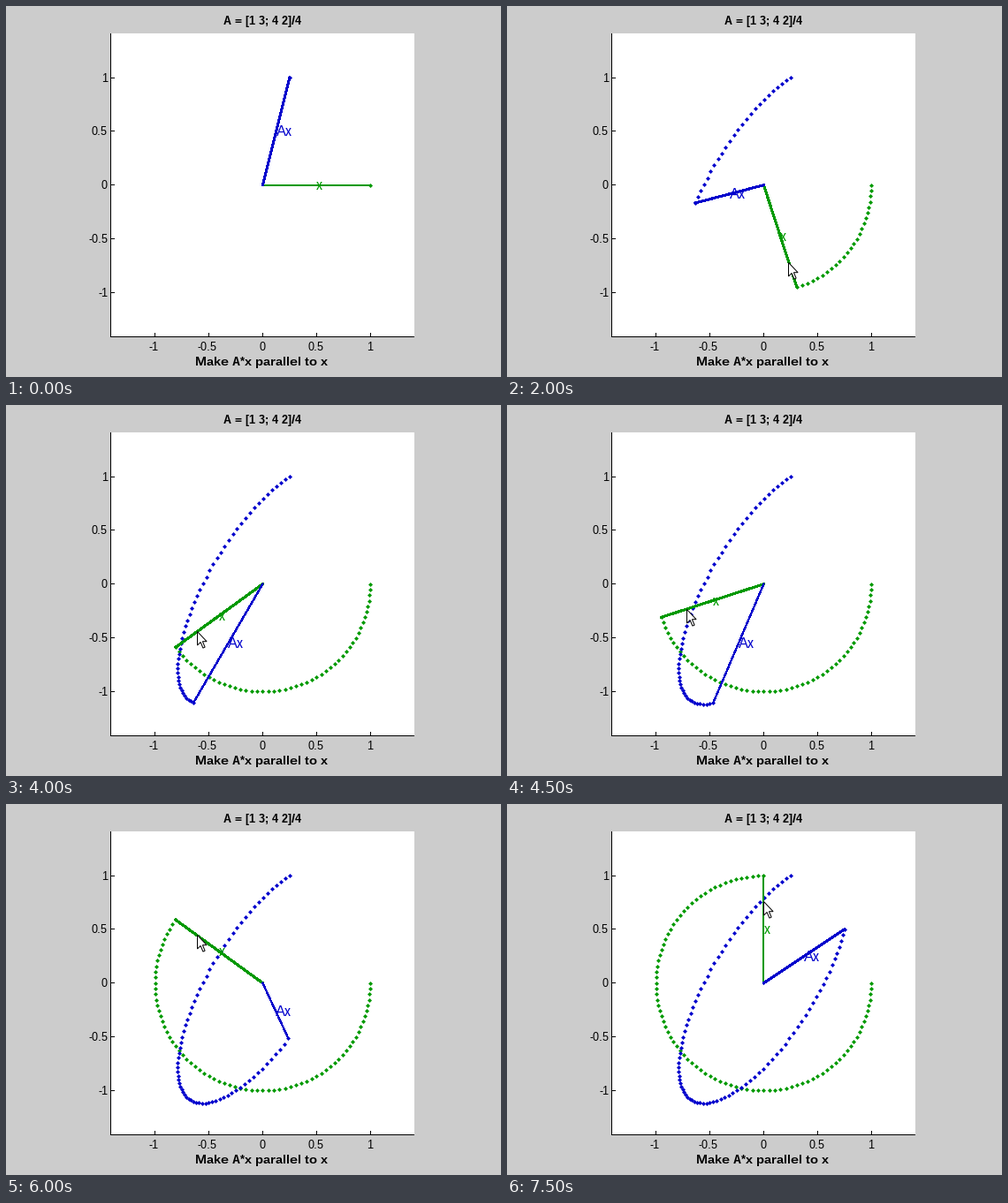
A matplotlib script for the animation above (8 s loop, 560x420 px).

```python
import numpy as np
import matplotlib.pyplot as plt
from matplotlib.animation import FuncAnimation
from matplotlib.patches import Polygon, Rectangle

W, H, DPI = 560, 420, 80
PT = 72 / DPI                      # points per pixel
CX, CY, R = 290.4, 202.7, 121.6    # origin and unit length in pixels
FRAMES, STEP, SUB = 16, 18, 3      # degrees per frame and per trail dot
GREEN, BLUE = "#009900", "#0000cc"
A = np.array([[1, 3], [4, 2]]) / 4
ARROW = np.array([(0, 0), (0, 15.5), (3.6, 12), (6.4, 18.6), (8.6, 17.6),
                  (5.9, 11.2), (10.6, 11.2)])

plt.rcParams["font.family"] = "Liberation Sans"
plt.rcParams["text.hinting"] = "native"
plt.rcParams["text.hinting_factor"] = 1

fig = plt.figure(figsize=(W / DPI, H / DPI), dpi=DPI, facecolor="#cccccc")
ax = fig.add_axes([0, 0, 1, 1])
ax.set(xlim=(0, W), ylim=(H, 0))
ax.axis("off")


def to_px(v):
    return np.array([CX + R * v[0], CY - R * v[1]])


def bar(x, y, w, h, color="black"):
    ax.add_patch(Rectangle((x, y), w, h, color=color, lw=0, antialiased=False))


def label(x, y, s, size=13.2, ha="center", **kw):
    return ax.text(x, y, s, fontsize=size * PT, ha=ha, va="baseline", **kw)


def draw_axes():
    bar(118, 31, 344, 344, "white")
    bar(118, 31, 1, 344)
    bar(118, 374, 344, 1)
    for v in (-1, -0.5, 0, 0.5, 1):
        x, y = np.floor(to_px((v, v)))
        bar(x, 370, 1, 4)
        bar(119, y, 4, 1)
        label(x - (1.5 if v < 0 else 0), 390, f"{v:g}")
        label(115, y + 5, f"{v:g}", ha="right")
    label(289.5, 21, "A = [1 3; 4 2]/4", weight="bold")
    label(288.5, 407, "Make A*x parallel to x", 13.6, weight="bold")


class Vector:
    """A line from the origin with a dotted trail and a name at its middle."""

    def __init__(self, name, color, matrix):
        self.matrix = matrix
        self.trail, = ax.plot([], [], ls="none", color=color, mew=0,
                              marker=[(0, 1), (1, 0), (0, -1), (-1, 0)],
                              ms=5 * PT, antialiased=False, zorder=3)
        self.line, = ax.plot([], [], color=color, antialiased=False, zorder=4)
        self.name = label(0, 0, name, 16, "left", color=color, zorder=5)

    def update(self, angles):
        pts = to_px(self.matrix @ np.array([np.cos(angles), np.sin(angles)]))
        tip = pts[:, -1]
        dx, dy = np.abs(tip - (CX, CY))
        # the pixel pen thins out on steep diagonals
        thin = 1.5 * dx < dy < 2.7 * dx
        self.trail.set_data(*pts)
        self.line.set_data([CX, tip[0]], [CY, tip[1]])
        self.line.set_linewidth((1.2 if thin else 2) * PT)
        mid = (tip + (CX, CY)) / 2
        self.name.set_position((mid[0], mid[1] + 5.5))


draw_axes()
vectors = [Vector("x", GREEN, np.eye(2)), Vector("Ax", BLUE, A)]
cursor = ax.add_patch(Polygon(ARROW, fc="white", ec="black", lw=PT,
                              joinstyle="miter", zorder=6))


def update(i):
    angles = -np.radians(np.arange(0, i * STEP + 1, SUB))
    for v in vectors:
        v.update(angles)
    end = angles[-1]
    tip = np.floor(to_px((0.755 * np.cos(end), 0.755 * np.sin(end)))) + 0.5
    cursor.set_xy(ARROW + tip)
    cursor.set_visible(i > 0)
    return []


anim = FuncAnimation(fig, update, frames=FRAMES, interval=500, repeat=True,
                     repeat_delay=0, blit=False)
plt.show()
```
